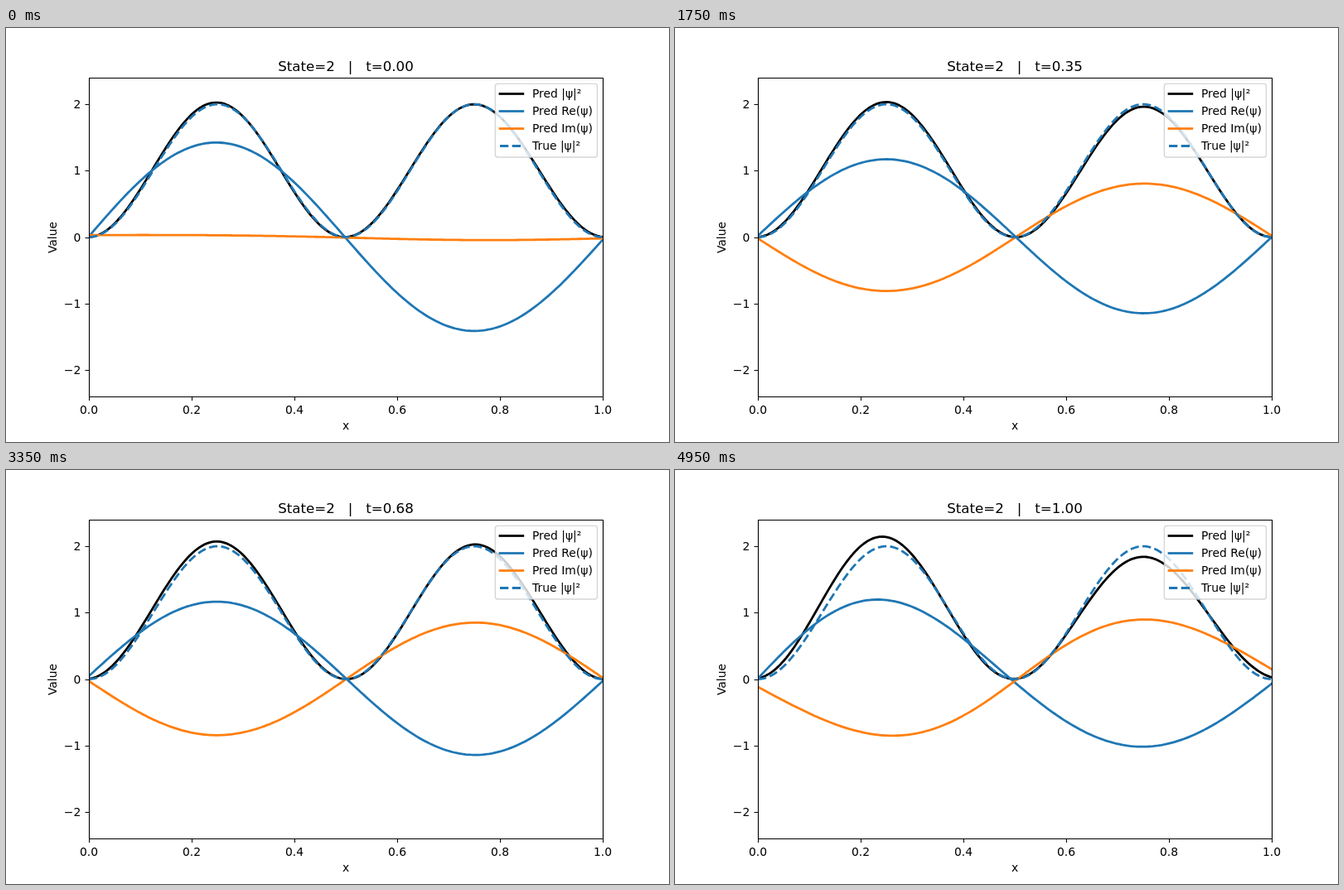
Write an HTML page with a canvas that moves like this. It is 800x500 px and loops after 5 s.

```html
<!DOCTYPE html>
<html lang="en">
<head>
<meta charset="utf-8">
<title>Wave function</title>
<style>
html, body { margin: 0; width: 100%; height: 100%; overflow: hidden; background: #fff; }
canvas { display: block; }
</style>
</head>
<body>
<canvas id="stage" width="800" height="500"></canvas>
<script>
const ctx = document.getElementById("stage").getContext("2d");
const BLACK = "#000", BLUE = "#1f77b4", ORANGE = "#ff7f0e";
const LEFT = 100, RIGHT = 720, TOP = 60, BOTTOM = 445;
const STEPS = 100, STEP_MS = 50, SAMPLES = 200;
const LINE = 2.78, DASH = [10.28, 4.44];
const ENERGY = 2 * Math.PI ** 2;

const px = x => LEFT + x * (RIGHT - LEFT);
const py = v => (TOP + BOTTOM) / 2 - v * (BOTTOM - TOP) / 4.8;

// Predicted wave at chosen steps: values at x = 0, 1/4, 1/2, 3/4, 1, then the sin(4 pi x) weight.
const keys = [
  { step: 0, re: [0.01, 1.423, -0.015, -1.413, -0.04, 0], im: [0.03, 0.027, -0.008, -0.045, -0.02, 0] },
  { step: 21, re: [0, -0.79, 0.01, 0.785, 0.02, 0], im: [0.02, 1.173, 0.012, -1.208, -0.045, 0] },
  { step: 35, re: [0.02, 1.172, 0.015, -1.147, 0, 0], im: [-0.02, -0.812, -0.01, 0.805, 0.02, 0] },
  { step: 53, re: [0, -0.737, 0.01, 0.763, 0.03, 0], im: [0.01, 1.192, 0.012, -1.207, -0.035, 0] },
  { step: 67, re: [0.045, 1.165, 0.012, -1.142, -0.03, 0], im: [-0.03, -0.845, -0.005, 0.85, 0.02, 0] },
  { step: 85, re: [0.015, -0.665, -0.03, 0.743, 0.03, 0], im: [0.015, 1.243, -0.005, -1.23, -0.045, 0] },
  { step: 99, re: [0.01, 1.19, -0.05, -1.018, -0.07, 0.025], im: [-0.118, -0.85, -0.03, 0.897, 0.148, 0.033] }
];

const phaseAt = step => ENERGY * step / (STEPS - 1);

function rotate({ re, im }, angle) {
  const c = Math.cos(angle), s = Math.sin(angle);
  return {
    re: re.map((r, i) => r * c - im[i] * s),
    im: re.map((r, i) => r * s + im[i] * c)
  };
}

// Blend in the frame that turns with the wave, then turn back.
function waveAt(step) {
  let i = 0;
  while (i < keys.length - 2 && step > keys[i + 1].step) i++;
  const [a, b] = [keys[i], keys[i + 1]];
  const k = (step - a.step) / (b.step - a.step);
  const from = rotate(a, phaseAt(a.step)), to = rotate(b, phaseAt(b.step));
  const mix = part => from[part].map((v, j) => v + (to[part][j] - v) * k);
  return rotate({ re: mix("re"), im: mix("im") }, -phaseAt(step));
}

// A straight line between the ends plus four sine terms.
function curveThrough([start, l, m, r, end, a4]) {
  const base = x => start + (end - start) * x;
  const gl = l - base(0.25), gm = m - base(0.5), gr = r - base(0.75);
  const sum = (gl + gr) / Math.SQRT2;
  const weights = [(sum + gm) / 2, (gl - gr) / 2, (sum - gm) / 2, a4];
  return x => weights.reduce((v, w, n) => v + w * Math.sin((n + 1) * Math.PI * x), base(x));
}

function stroke(color, width, dash = []) {
  ctx.strokeStyle = color;
  ctx.lineWidth = width;
  ctx.lineCap = dash.length ? "butt" : "square";
  ctx.lineJoin = "round";
  ctx.setLineDash(dash);
  ctx.stroke();
}

function segment(x1, y1, x2, y2, color, width, dash) {
  ctx.beginPath();
  ctx.moveTo(x1, y1);
  ctx.lineTo(x2, y2);
  stroke(color, width, dash);
}

function plot(f, color, dash) {
  ctx.beginPath();
  for (let i = 0; i < SAMPLES; i++) {
    const x = i / (SAMPLES - 1);
    ctx.lineTo(px(x), py(f(x)));
  }
  stroke(color, LINE, dash);
}

function text(label, x, y, align = "center", size = 13.89) {
  ctx.font = `${size}px "DejaVu Sans", sans-serif`;
  ctx.textAlign = align;
  ctx.fillStyle = BLACK;
  ctx.fillText(label, x, y);
}

function drawAxes() {
  for (let i = 0; i <= 5; i++) {
    const x = px(i / 5) + 0.5;
    segment(x, BOTTOM + 1, x, BOTTOM + 4.5, BLACK, 1);
    text((i / 5).toFixed(1), px(i / 5), 466);
  }
  for (let v = -2; v <= 2; v++) {
    const y = Math.round(py(v));
    segment(LEFT - 4, y + 0.5, LEFT, y + 0.5, BLACK, 1);
    text(v < 0 ? "\u2212" + -v : String(v), 90.3, y + 5, "right");
  }
  ctx.beginPath();
  ctx.rect(LEFT + 0.5, TOP + 0.5, RIGHT - LEFT, BOTTOM - TOP);
  stroke(BLACK, 1.11);
  text("x", 410, 485);
  ctx.save();
  ctx.translate(61, 253);
  ctx.rotate(-Math.PI / 2);
  text("Value", 0, 0);
  ctx.restore();
}

function drawLegend() {
  ctx.beginPath();
  ctx.roundRect(590.4, 67.4, 123, 88.6, 2.8);
  ctx.fillStyle = "rgba(255,255,255,0.8)";
  ctx.fill();
  stroke("rgba(204,204,204,0.8)", 1.39);
  const rows = [
    ["Pred |ψ|²", BLACK],
    ["Pred Re(ψ)", BLUE],
    ["Pred Im(ψ)", ORANGE],
    ["True |ψ|²", BLUE, DASH]
  ];
  rows.forEach(([label, color, dash], i) => {
    const y = 79.5 + 21 * i;
    segment(596, y, 623.8, y, color, LINE, dash);
    text(label, 635, y + 4.5, "left");
  });
}

function draw(step) {
  const wave = waveAt(step);
  const re = curveThrough(wave.re), im = curveThrough(wave.im);
  ctx.fillStyle = "#fff";
  ctx.fillRect(0, 0, 800, 500);
  ctx.save();
  ctx.beginPath();
  ctx.rect(LEFT, TOP, RIGHT - LEFT, BOTTOM - TOP);
  ctx.clip();
  plot(x => re(x) ** 2 + im(x) ** 2, BLACK);
  plot(re, BLUE);
  plot(im, ORANGE);
  plot(x => 2 * Math.sin(2 * Math.PI * x) ** 2, BLUE, DASH);
  ctx.restore();
  drawAxes();
  drawLegend();
  text(`State=2   |   t=${(step / (STEPS - 1)).toFixed(2)}`, 410, 52, "center", 16.67);
}

const startTime = performance.now();
function tick() {
  const elapsed = Math.max(0, performance.now() - startTime);
  draw(Math.floor(elapsed / STEP_MS) % STEPS);
  requestAnimationFrame(tick);
}
tick();
</script>
</body>
</html>
```
